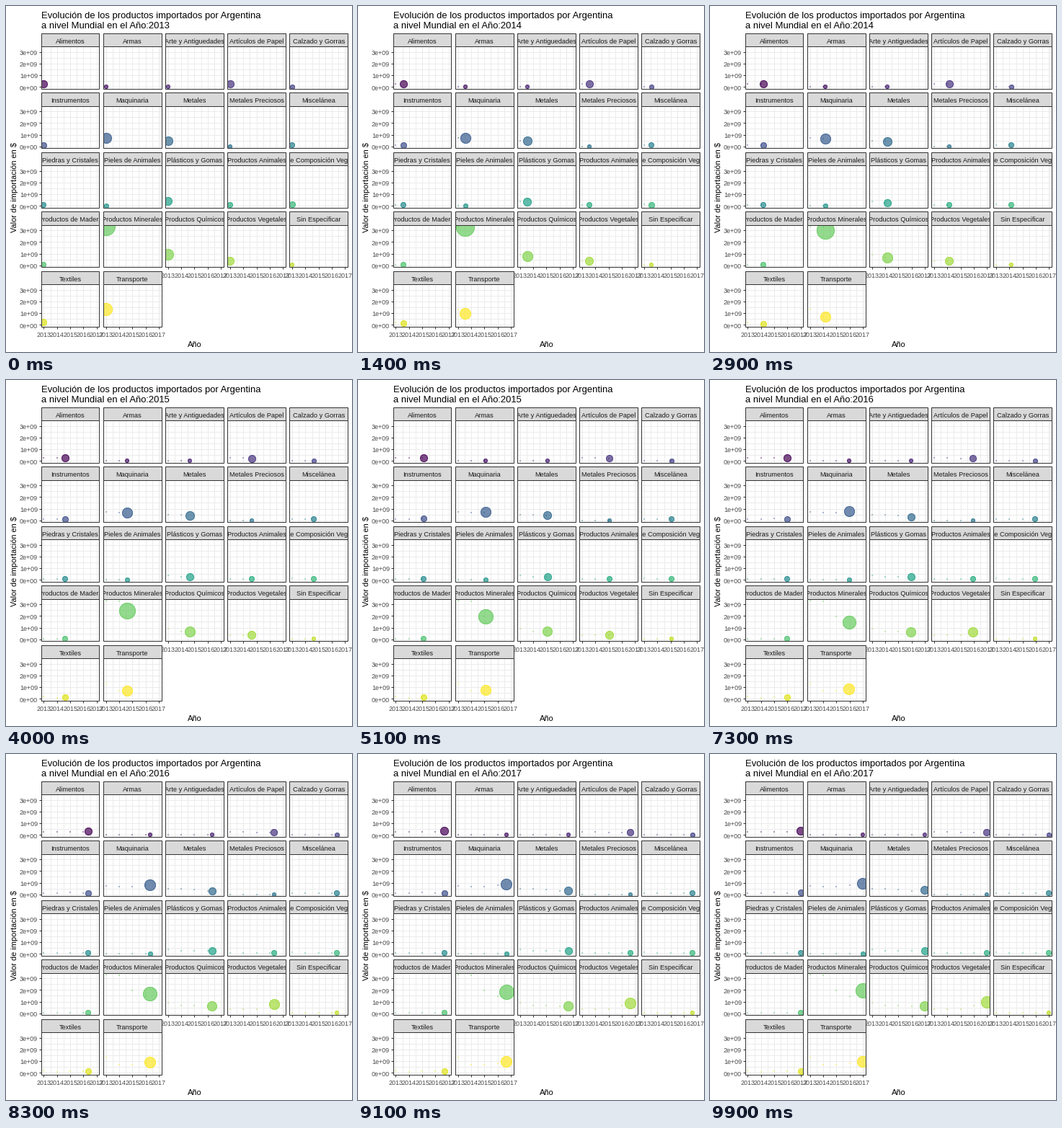
Write a matplotlib script that moves like this. It is 480 px wide and 480 px high and loops after 10 s.

```python
import numpy as np
import matplotlib.pyplot as plt
from matplotlib.animation import FuncAnimation
from matplotlib.collections import LineCollection
from matplotlib.patches import Circle, Rectangle

plt.rcParams["font.family"] = "Liberation Sans"

FRAMES, INTERVAL = 100, 100
YEARS = np.arange(2013, 2018)
KEYS = np.round(np.linspace(1, FRAMES, 5)) - 1

# Imports per year, in 1e9 dollars
DATA = {
    "Alimentos": (.27, .27, .26, .27, .35),
    "Armas": (.01,),
    "Arte y Antiguedades": (.005,),
    "Artículos de Papel": (.28, .27, .2, .18, .21),
    "Calzado y Gorras": (.03, .03, .03, .03, .04),
    "Instrumentos": (.1, .13, .14, .13, .14),
    "Maquinaria": (.75, .69, .69, .76, .9),
    "Metales": (.5, .45, .4, .28, .34),
    "Metales Preciosos": (.01,),
    "Miscelánea": (.08,),
    "Piedras y Cristales": (.05, .09, .08, .06, .05),
    "Pieles de Animales": (.02,),
    "Plásticos y Gomas": (.36, .29, .26, .27, .29),
    "Productos Animales": (.08, .07, .07, .07, .08),
    "P. de Composición Vegetal": (.11, .08, .08, .08, .08),
    "Productos de Madera": (.06, .06, .05, .05, .05),
    "Productos Minerales": (3.3, 3.23, 1.97, 1.47, 1.97),
    "Productos Químicos": (.9, .69, .66, .62, .59),
    "Productos Vegetales": (.35, .35, .36, .64, .98),
    "Sin Especificar": (.015,),
    "Textiles": (.2, .1, .12, .12, .14),
    "Transporte": (1.32, .69, .72, .84, .95),
}
VALUES = np.array([np.resize(v, 5) for v in DATA.values()])
VMAX = VALUES.max()
COLORS = plt.get_cmap("viridis")(np.linspace(0, 1, len(DATA)))[:, :3]

# Facet layout in pixels
LEFT, TOP = 48.8, 37.9
W, H, STRIP, GAP = 80.64, 58.8, 18.2, 5.5
XUNIT, YUNIT = W / 4.4, H / 1.1 / VMAX
INK, AXIS_INK = "#333333", "#4D4D4D"

fig = plt.figure(figsize=(480 / 72, 480 / 72), dpi=72, facecolor="white")
ax = fig.add_axes([0, 0, 1, 1])
ax.set(xlim=(0, 480), ylim=(480, 0))
ax.axis("off")


def origin(i):
    """Left edge and bottom edge of panel i."""
    row, col = divmod(i, 5)
    return LEFT + col * (W + GAP), TOP + row * (STRIP + H + GAP) + STRIP + H


def to_x(left, year):
    return left + (year - 2013 + .2) * XUNIT


def to_y(bottom, value):
    return bottom - H / 22 - value * YUNIT


def diameter(value):
    size = 2 + 10 * np.sqrt(value / VMAX)
    return (size * 2.845 + .945) * .75


def label(x, y, text, size, color="black", **kw):
    return ax.text(x, y, text, fontsize=size, color=color, va="baseline", **kw)


def box(x, y, w, h, **kw):
    return ax.add_patch(Rectangle((x, y), w, h, lw=1, **kw))


def circle(clip, **kw):
    patch = ax.add_patch(Circle((0, 0), 1, alpha=.7, zorder=3, **kw))
    patch.set_clip_path(clip)
    return patch


grid, ticks, discs, rings = [], [], [], []
for i, name in enumerate(DATA):
    left, bottom = origin(i)
    top = bottom - H
    for year in np.arange(2013, 2017.1, .5):
        x = to_x(left, year)
        grid.append([(x, top), (x, bottom)])
    for value in np.arange(0, 3.1, .5):
        y = to_y(bottom, value)
        grid.append([(left, y), (left + W, y)])

    frame = box(left, top, W, H, fc="none", ec=INK, zorder=4)
    strip = box(left, top - STRIP, W, STRIP, fc="#D9D9D9", ec=INK, zorder=5)
    text = label(left + W / 2 + .3, top - 4.2, name, 9.3, "#1A1A1A",
                 ha="center", clip_on=True, zorder=6)
    text.set_clip_path(strip)

    discs.append(circle(frame, fc=COLORS[i], lw=0))
    rings.append(circle(frame, fill=False, ec=COLORS[i], lw=1))

    if i % 5 == 0:
        for value in range(4):
            y = to_y(bottom, value)
            ticks.append([(left - 2.75, y), (left, y)])
            label(44, y + 4.3, f"{value}e+{'09' if value else '00'}", 9,
                  AXIS_INK, ha="right")
    if i + 5 >= len(DATA):
        for year in YEARS:
            x = to_x(left, year)
            ticks.append([(x, bottom), (x, bottom + 2.75)])
            label(x, bottom + 14.5, str(year), 9, AXIS_INK, ha="center")

ax.add_collection(LineCollection(grid, colors="#EBEBEB", linewidths=1,
                                 snap=True, zorder=1))
ax.add_collection(LineCollection(ticks, colors=INK, linewidths=1,
                                 snap=True, zorder=4))

origins = np.array([origin(i) for i in range(len(DATA))])
marks = [ax.scatter(np.round(to_x(origins[:, 0], year)),
                    np.round(to_y(origins[:, 1], VALUES[:, k])),
                    s=4, marker="s", c=COLORS, lw=0, alpha=.4, zorder=2)
         for k, year in enumerate(YEARS[:-1])]

label(49, 17, "Evolución de los productos importados por Argentina", 13)
title = label(49, 31, "", 13)
label(261.3, 473, "Año", 11, ha="center")
label(15.5, 251.3, "Valor de importación en $", 11, ha="center",
      rotation=90, rotation_mode="anchor")

SIZES = diameter(VALUES)


def update(n):
    year = np.interp(n, KEYS, YEARS)
    shown = round(2013 + 4 * n / (FRAMES - 1))
    title.set_text(f"a nivel Mundial en el Año:{shown}")
    for i, (left, bottom) in enumerate(origins):
        # Bubbles sit on whole pixels
        d = int(np.interp(n, KEYS, SIZES[i]) + .5)
        value = np.interp(n, KEYS, VALUES[i])
        odd = d % 2 / 2
        center = round(to_x(left, year)) + odd, round(to_y(bottom, value)) + odd
        discs[i].center = rings[i].center = center
        discs[i].set_radius(d / 2)
        rings[i].set_radius(d / 2 - .5)
    for key, mark in zip(KEYS, marks):
        mark.set_visible(n > key)
    return [title, *discs, *rings, *marks]


anim = FuncAnimation(fig, update, frames=FRAMES, interval=INTERVAL,
                     repeat=True, repeat_delay=0, blit=False)
plt.show()
```
